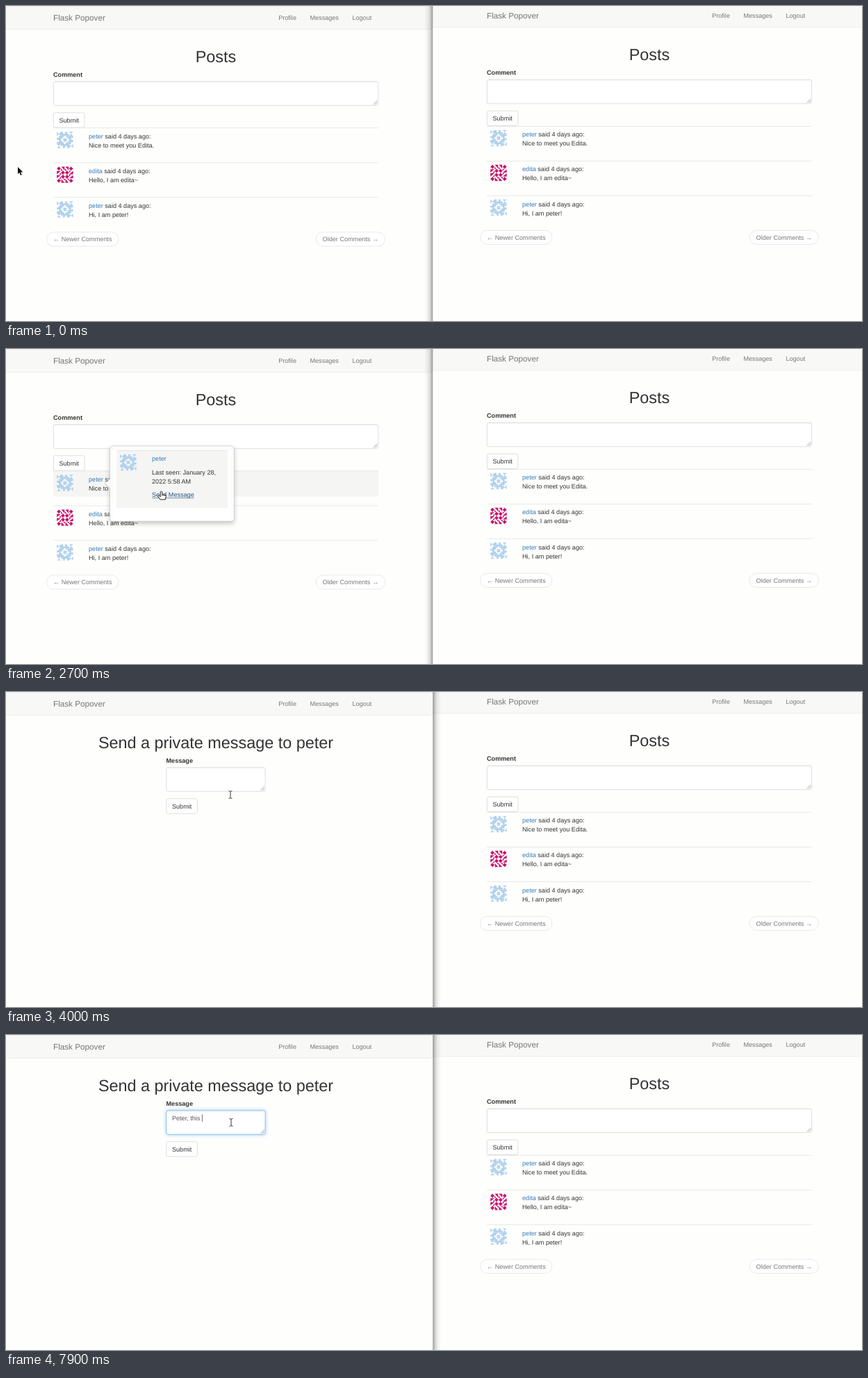
Recreate the animation shown at these times as an HTML page with a canvas. Size 1232 px wide and 454 px high, loop 8000 ms.

```html
<!DOCTYPE html>
<html lang="en">
<head>
<meta charset="utf-8">
<title>Flask Popover</title>
<style>
  html, body { margin: 0; width: 100%; height: 100%; overflow: hidden; background: #fefefd; }
  canvas { display: block; }
</style>
</head>
<body>
<canvas id="stage" width="1232" height="454"></canvas>
<script>
const ctx = document.getElementById('stage').getContext('2d');
const LOOP = 8000, ZOOM = 0.65, EDGE = 614.25;
const BG = '#fefefd', INK = '#333', GREY = '#777', LINK = '#337ab7', LINK_HOVER = '#23527c';
const BLUE = '#b0d1ed', PINK = '#c9126b';
const TABLE_TOP = 270, TABLE_STEP = 77, TABLE_H = 57;
const POPUP_AT = 1700, NEXT_PAGE_AT = 3300, FOCUS_AT = 4300;

const posts = [
  { user: 'peter', color: BLUE, body: 'Nice to meet you Edita.' },
  { user: 'edita', color: PINK, body: 'Hello, I am edita~' },
  { user: 'peter', color: BLUE, body: 'Hi, I am peter!' }
];

// time, x, y, pointer shape
const track = [
  [0, 17, 232, 'arrow'], [700, 40, 232, 'arrow'], [800, 84, 222, 'arrow'],
  [900, 140, 206, 'beam'], [1000, 201, 198, 'beam'], [1100, 170, 191, 'beam'],
  [1200, 148, 189, 'beam'], [1300, 123.5, 183, 'hand'],
  [2100, 180, 157, 'arrow'], [2200, 288, 190, 'arrow'], [2300, 207, 206, 'beam'],
  [2500, 214, 205.5, 'hand'], [2600, 219, 205.5, 'hand'], [2700, 223.5, 205, 'hand'],
  [3100, 222, 206, 'arrow'], [3400, 226, 205, 'arrow'], [3500, 233, 203, 'arrow'],
  [3600, 240, 200, 'arrow'], [3800, 321, 150, 'arrow'], [4000, 323, 148, 'beam'],
  [4100, 323, 140, 'beam'], [4200, 324, 132, 'beam'], [4300, 324, 126, 'beam']
];

const message = 'Peter, this ';
// time, number of characters typed
const typing = [[0, 0], [5200, 1], [5300, 2], [5600, 3], [5800, 4], [5900, 5],
  [7300, 7], [7500, 8], [7600, 9], [7800, 10], [7900, 12]];

const latest = (list, t) => list.filter(item => item[0] <= t).pop();
const between = (t, a, b) => t >= a && t < b;

function setFont(size = 14, weight = 'normal') {
  ctx.font = `${weight} ${size}px "Liberation Sans", Arial, sans-serif`;
}

// y is the middle of the text line; returns the x after the text
function text(str, x, y, { color = INK, size = 14, weight, align = 'left' } = {}) {
  setFont(size, weight);
  ctx.fillStyle = color;
  ctx.textAlign = align;
  ctx.fillText(str, x, y + size * 0.35);
  return x + ctx.measureText(str).width;
}

function rect(x, y, w, h, color) {
  ctx.fillStyle = color;
  ctx.fillRect(x, y, w, h);
}

function box(x, y, w, h, r, fill, border) {
  ctx.beginPath();
  ctx.roundRect(x + 0.5, y + 0.5, w - 1, h - 1, r);
  ctx.fillStyle = fill;
  ctx.fill();
  ctx.strokeStyle = border;
  ctx.lineWidth = 1;
  ctx.stroke();
}

function poly(points, color) {
  ctx.fillStyle = color;
  ctx.beginPath();
  for (let i = 0; i < points.length; i += 2) ctx.lineTo(points[i], points[i + 1]);
  ctx.closePath();
  ctx.fill();
}

function shadow(color, blur, dy = 0) {
  ctx.shadowColor = color;
  ctx.shadowBlur = blur * ZOOM;
  ctx.shadowOffsetY = dy * ZOOM;
}

// Unit-cell polygons: corner, side and centre of a four-fold tile
const tiles = {
  [BLUE]: {
    corner: [[0, 0, 0.5, 0.5, 0, 1], [1, 0, 1, 1, 0.5, 0.5]],
    side: [[0, 0, 0.5, 0, 0.5, 0.5, 1, 0.5, 1, 1, 0, 1]],
    centre: [[0, 0, 0.75, 0, 0.75, 0.35, 0.35, 0.35, 0.35, 0.75, 0, 0.75], [0.6, 0.6, 1, 0.6, 1, 1, 0.6, 1]]
  },
  [PINK]: {
    corner: [[0.5, 0, 1, 0.5, 0.5, 1, 0, 0.5]],
    side: [[0.1, 0, 0.9, 0, 0.9, 0.95], [0, 0.5, 0.5, 1, 0, 1]],
    centre: [[0.5, 0, 1, 0.5, 0.5, 1, 0, 0.5]]
  }
};

function avatar(x, y, color) {
  const { corner, side, centre } = tiles[color];
  const cell = (cx, cy, turn, shape) => {
    ctx.save();
    ctx.translate(cx + 0.5, cy + 0.5);
    ctx.rotate(turn * Math.PI / 2);
    ctx.translate(-0.5, -0.5);
    shape.forEach(p => poly(p, color));
    ctx.restore();
  };
  ctx.save();
  ctx.translate(x + 18, y + 18);
  ctx.scale(9, 9);
  for (let i = 0; i < 4; i++) {
    cell(-2, -2, 0, corner);
    cell(-1, -2, 0, side);
    cell(-2, -1, 3, side);
    cell(-1, -1, 0, centre);
    ctx.rotate(Math.PI / 2);
  }
  ctx.restore();
}

function navbar() {
  rect(-200, 0, 1200, 52, '#e7e7e6');
  rect(-200, 1, 1200, 50, '#f8f8f7');
  text('Flask Popover', 0, 26, { color: GREY, size: 18 });
  let right = 705;
  for (const item of ['Logout', 'Messages', 'Profile']) {
    text(item, right, 26, { color: GREY, align: 'right' });
    right -= ctx.measureText(item).width + 30;
  }
}

function form(title, label, x, w, focus = 0) {
  text(title, 360, 111.7, { size: 36, align: 'center' });
  text(label, x, 152, { weight: 'bold' });
  ctx.save();
  if (focus) shadow(`rgba(102,175,233,${0.6 * focus})`, 8);
  box(x, 167, w, 54, 4, '#fff', focus ? '#66afe9' : '#ccc');
  ctx.restore();
  rect(x + 3, 168, w - 6, 1, 'rgba(0,0,0,.06)');
  ctx.strokeStyle = '#777';
  ctx.beginPath();
  for (const d of [9, 5]) {
    ctx.moveTo(x + w - 2 - d, 218.5);
    ctx.lineTo(x + w - 2.5, 219 - d);
  }
  ctx.stroke();
  box(x, 236, 69.6, 34, 4, '#fff', '#ccc');
  text('Submit', x + 34.8, 253, { align: 'center' });
}

function pill(label, x, right) {
  setFont();
  const w = ctx.measureText(label).width + 30;
  const left = right ? x - w : x;
  box(left, 501, w, 32, 15, '#fff', '#ddd');
  text(label, left + 15, 517, { color: GREY });
}

function postsPage(hoverRow = -1, hoverUser = false) {
  form('Posts', 'Comment', 0, 720);
  posts.forEach(({ user, color, body }, i) => {
    const y = TABLE_TOP + i * TABLE_STEP;
    if (i === hoverRow) rect(0, y, 720, TABLE_H, '#f5f5f4');
    rect(0, y, 720, 1, '#ddd');
    avatar(8, y + 9, color);
    const active = hoverUser && i === 0;
    const end = text(user + ' ', 78.5, y + 19, { color: active ? LINK_HOVER : LINK });
    if (active) rect(78.5, y + 25, end - 78.5, 1, LINK_HOVER);
    text('said 4 days ago:', end, y + 19);
    text(body, 78.5, y + 39);
  });
  pill('← Newer Comments', -15, false);
  pill('Older Comments →', 735, true);
}

function popover(hoverLink) {
  const x = 125, y = 214.5, mid = y + 84;
  ctx.save();
  shadow('rgba(0,0,0,.2)', 10, 5);
  box(x, y, 276, 168, 6, '#fff', '#c4c4c4');
  ctx.restore();
  poly([x, mid - 11, x - 11, mid, x, mid + 11], '#c4c4c4');
  poly([x + 1, mid - 10, x - 9.5, mid, x + 1, mid + 10], '#fff');
  rect(x + 15, y + 10, 246, 128, '#f5f5f4');
  rect(x + 15, y + 10, 246, 1, '#ddd');
  avatar(x + 23, y + 19, BLUE);
  const tx = 218.5;
  text('peter', tx, y + 29, { color: LINK });
  text('Last seen: January 28,', tx, y + 59);
  text('2022 5:58 AM', tx, y + 79);
  const end = text('Send Message', tx, y + 109, { color: hoverLink ? LINK_HOVER : LINK });
  if (hoverLink) rect(tx, y + 115.5, end - tx, 1, LINK_HOVER);
}

function messagePage(t) {
  const focus = t >= FOCUS_AT + 100 ? 1 : t >= FOCUS_AT ? 0.6 : 0;
  form('Send a private message to peter', 'Message', 250, 220, focus);
  const end = text(message.slice(0, latest(typing, t)[1]), 263, 184, { color: '#555' });
  const blank = between(t, 4800, 5200) || between(t, 6600, 7100);
  if (focus && !blank) rect(end, 176, 1.2, 16, '#444');
}

const arrowShape = new Path2D('M0 0V10.2L2.3 8.1L4 12L5.8 11.2L4.1 7.5H7.4Z');
const handShape = new Path2D('M-1.3 1Q0 -.7 1.3 1V4.6L5.6 5.3Q7 5.6 6.8 7.4L5.8 12H-1.4L-4.7 7.6Q-4.6 5.8 -3 6.5L-1.3 8Z');
const knuckles = new Path2D('M1.3 4.6V7M3.2 5V7M5 5.3V7');
const beamShape = new Path2D('M-2.5 -5.4Q0 -5.4 0 -4.2Q0 -5.4 2.5 -5.4M0 -4.5V4.5M-2.5 5.4Q0 5.4 0 4.2Q0 5.4 2.5 5.4');

function pointer(x, y, kind) {
  ctx.save();
  ctx.translate(x, y);
  ctx.lineJoin = 'round';
  const stroke = (path, color, width) => {
    ctx.strokeStyle = color;
    ctx.lineWidth = width;
    ctx.stroke(path);
  };
  if (kind === 'arrow') {
    stroke(arrowShape, '#fff', 1.2);
    ctx.fillStyle = '#111';
    ctx.fill(arrowShape);
  } else if (kind === 'hand') {
    ctx.fillStyle = '#fff';
    ctx.fill(handShape);
    stroke(handShape, '#222', 1);
    stroke(knuckles, '#222', 0.7);
  } else {
    stroke(beamShape, '#fff', 2);
    stroke(beamShape, '#333', 1);
  }
  ctx.restore();
}

// One browser window, drawn in page units from the left of its content
function pane(from, to, x, y, draw) {
  ctx.save();
  ctx.beginPath();
  ctx.rect(from, 0, to - from, 454);
  ctx.clip();
  ctx.translate(x, y);
  ctx.scale(ZOOM, ZOOM);
  navbar();
  draw();
  ctx.restore();
}

function windowShadow(side) {
  const size = 12;
  const fade = ctx.createLinearGradient(EDGE, 0, EDGE + side * size, 0);
  [[0, 0.4], [0.15, 0.27], [0.35, 0.14], [0.6, 0.06], [1, 0]]
    .forEach(([at, alpha]) => fade.addColorStop(at, `rgba(0,0,0,${alpha})`));
  rect(side > 0 ? EDGE : EDGE - size, 0, size, 454, fade);
}

function rowAt(x, y) {
  const py = y / ZOOM - TABLE_TOP;
  const row = Math.floor(py / TABLE_STEP);
  const inside = x > 68 && x < 536 && py >= 0 && py - row * TABLE_STEP < TABLE_H;
  return inside ? row : -1;
}

function draw(t) {
  const [, x, y, kind] = latest(track, t);
  rect(0, 0, 1232, 454, BG);
  pane(0, EDGE, 68, 0, () => {
    if (t >= NEXT_PAGE_AT) return messagePage(t);
    const open = t >= POPUP_AT;
    postsPage(open ? 0 : rowAt(x, y), between(t, 1300, 2100));
    if (open) popover(t >= 2500);
  });
  pane(EDGE, 1232, 692, -2.6, () => postsPage());
  windowShadow(t < 2900 ? -1 : 1);
  pointer(x, y, kind);
}

ctx.textRendering = 'geometricPrecision';
const start = performance.now();
function tick() {
  draw((performance.now() - start) % LOOP);
  requestAnimationFrame(tick);
}
tick();
</script>
</body>
</html>
```
